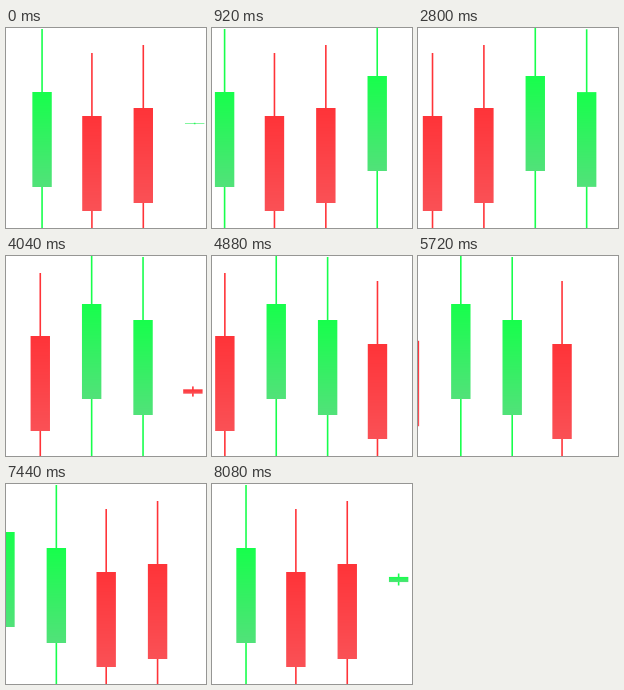
Write a matplotlib script that moves like this. It is 200x200 px and loops after 8120 ms.

```python
import numpy as np
import matplotlib.pyplot as plt
from matplotlib.animation import FuncAnimation
from matplotlib.colors import to_rgb

SIZE, FRAMES, STEP = 200, 203, 40
LIFE = 8000                 # ms from one birth of a candle to its next
DELAY = 2015                # ms between neighbours
FIRST = 3930                # birth of the first candle
START_X, TRAVEL = 189.7, 204
HALF_W, HALF_H = 9.7, 47.5  # body
WICK_W, WICK_H = 0.8, 110.5
GROW, SHRINK = 850, 280

GREEN = [np.array(to_rgb(c)) for c in ("#17ff4c", "#52e27a")]
RED = [np.array(to_rgb(c)) for c in ("#ff3439", "#fa5156")]
CANDLES = [(135.5, RED), (127.5, RED), (95.5, GREEN), (111.5, GREEN)]

PIX = np.arange(SIZE)


def cover(mid, half):
    """Share of each pixel lying within mid +- half."""
    return np.clip(np.minimum(mid + half, PIX + 1) - np.maximum(mid - half, PIX), 0, 1)


def smooth(u):
    u = np.clip(u, 0, 1)
    return u * u * (3 - 2 * u)


def paint(img, x, y, half_w, half_h, color):
    mask = np.outer(cover(y, half_h), cover(x, half_w))[..., None]
    img += (color - img) * mask


def draw_candle(img, x, y, scale, colors):
    top, bottom = colors
    half = HALF_H * scale
    paint(img, x, y, WICK_W, WICK_H * scale, top)
    mix = np.clip((PIX + 0.5 - y + half) / (2 * half), 0, 1)[:, None, None]
    paint(img, x, y, HALF_W, half, top + (bottom - top) * mix)


def render(n):
    img = np.ones((SIZE, SIZE, 3))
    for i, (y, colors) in enumerate(CANDLES):
        age = (n * STEP - FIRST - i * DELAY) % LIFE
        scale = smooth(age / GROW) * smooth((LIFE - age) / SHRINK)
        if scale > 0:
            draw_candle(img, START_X - TRAVEL * age / LIFE, y, scale, colors)
    return np.clip(img, 0, 1)


fig = plt.figure(figsize=(2, 2), dpi=100, facecolor="white")
ax = fig.add_axes([0, 0, 1, 1])
ax.axis("off")
view = ax.imshow(render(0), interpolation="nearest", aspect="auto")


def update(n):
    view.set_data(render(n))
    return [view]


anim = FuncAnimation(fig, update, frames=FRAMES, interval=STEP, repeat=True,
                     repeat_delay=0, blit=False)
plt.show()
```
